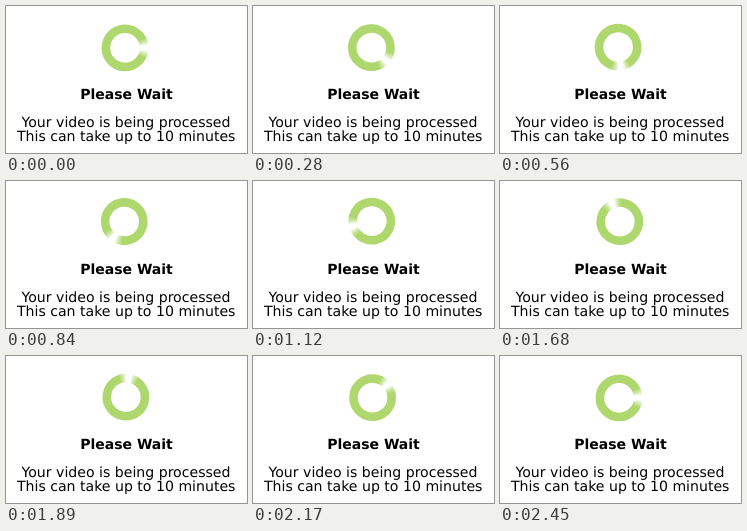
Animation of 241x147 px, one loop 2.52 s. Source, as an HTML page with a canvas:

```html
<!DOCTYPE html>
<html lang="en">
<head>
<meta charset="utf-8">
<title>Please Wait</title>
<style>
  html, body { margin: 0; width: 100%; height: 100%; overflow: hidden; background: #fff; }
  canvas, svg { position: absolute; left: 0; top: 0; }
  text { font: 14.1px "DejaVu Sans", Verdana, sans-serif; text-anchor: middle; text-rendering: geometricPrecision; }
  .title { font-weight: bold; font-size: 14px; }
</style>
</head>
<body>
<canvas width="241" height="147"></canvas>
<svg width="241" height="147">
  <text class="title" x="120.5" y="93">Please Wait</text>
  <text x="120" y="121">Your video is being processed</text>
  <text x="120.2" y="135">This can take up to 10 minutes</text>
</svg>
<script>
const FRAMES = 36, FRAME_MS = 70;
const PIVOT = { x: 119, y: 41 }, WOBBLE = 0.9;
const RADIUS = 19.1, THICKNESS = 8.6;
const ctx = document.querySelector("canvas").getContext("2d");

// Green ring with a soft white gap centred on angle 0
const ring = ctx.createConicGradient(0, 0, WOBBLE);
const stops = [[0, 0], [6, 0], [16, 0.55], [27, 1]];
for (const [degrees, alpha] of stops) {
  const color = `rgba(174, 216, 110, ${alpha})`;
  ring.addColorStop(degrees / 360, color);
  ring.addColorStop(1 - degrees / 360, color);
}

function draw() {
  const frame = Math.floor(performance.now() / FRAME_MS) % FRAMES;
  ctx.clearRect(0, 0, 241, 147);
  ctx.save();
  ctx.translate(PIVOT.x, PIVOT.y);
  // The last frame completes the turn, so the start pose holds for two frames
  ctx.rotate(frame / (FRAMES - 1) * 2 * Math.PI);
  ctx.beginPath();
  // The ring sits slightly off the pivot, so it wobbles as it turns
  ctx.arc(0, WOBBLE, RADIUS, 0, 2 * Math.PI);
  ctx.lineWidth = THICKNESS;
  ctx.strokeStyle = ring;
  ctx.stroke();
  ctx.restore();
  requestAnimationFrame(draw);
}
draw();
</script>
</body>
</html>
```
